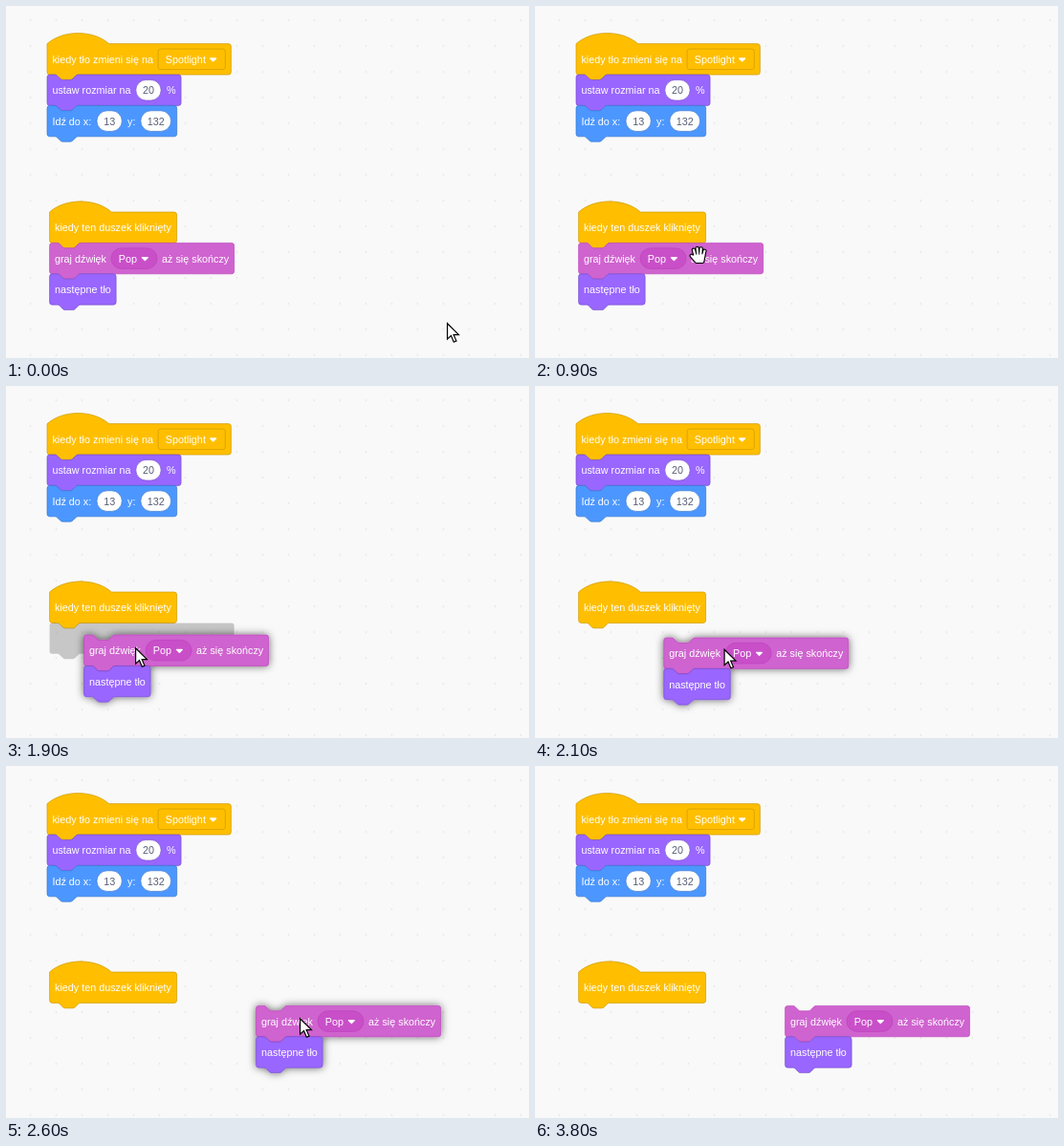
An HTML page that plays this animation: 547x369 px, repeating every 4200 ms.

```html
<!DOCTYPE html>
<html lang="pl">
<head>
<meta charset="utf-8">
<style>
html, body { margin: 0; width: 100%; height: 100%; overflow: hidden; background: #f9f9f9; }
svg { display: block; }
text { font: 16px "Liberation Sans", Arial, sans-serif; fill: #fff; stroke: none; }
.value { fill: #575e75; text-anchor: middle; }
</style>
</head>
<body>
<svg width="547" height="369" viewBox="0 0 547 369">
  <defs>
    <pattern id="dots" x="12" y="1.5" width="27" height="27" patternUnits="userSpaceOnUse">
      <rect x="12.8" y="12.8" width="1.4" height="1.4" fill="#ddd"/>
    </pattern>
    <filter id="shadow" x="-20%" y="-40%" width="140%" height="180%">
      <feDropShadow dx="0" dy="0" stdDeviation="6" flood-opacity=".6"/>
    </filter>
  </defs>
  <rect width="547" height="369" fill="url(#dots)"/>
  <g id="top" transform="translate(43 39.6) scale(.675)"></g>
  <g id="hat" transform="translate(45.6 216) scale(.675)"></g>
  <g id="drag"></g>
  <g id="arrow">
    <path d="M.6 .8V17.2l3.9-3.6 2.8 6.6 2.7-1.1-2.8-6.4h5.3z" fill="#fff" stroke="#000" stroke-width="1.2"/>
  </g>
  <g id="hand" stroke-linecap="round" stroke-linejoin="round"></g>
</svg>
<script>
const $ = id => document.getElementById(id);

const EVENT = ['#ffbf00', '#c90'], LOOKS = ['#96f', '#774dcb'],
      MOTION = ['#4c97ff', '#3373cc'], SOUND = ['#cf63cf', '#bd42bd'];

const CAP = 'M0 0c25-22 71-22 96 0';
const NOTCH = 'M0 4a4 4 0 0 1 4-4H12c2 0 3 1 4 2l4 4c1 1 2 2 4 2h12c2 0 3-1 4-2l4-4c1-1 2-2 4-2';
const outline = (w, start) => `${start}H${w - 4}a4 4 0 0 1 4 4v40a4 4 0 0 1-4 4H48` +
  'c-2 0-3 1-4 2l-4 4c-1 1-2 2-4 2h-12c-2 0-3-1-4-2l-4-4c-1-1-2-2-4-2H4a4 4 0 0 1-4-4z';

const block = (row, [fill, stroke], w, content, start = NOTCH) =>
  `<g transform="translate(0 ${row * 48})" stroke="${stroke}">
    <path d="${outline(w, start)}" fill="${fill}"/>${content}</g>`;
const label = (x, s) => `<text x="${x}" y="30.2">${s}</text>`;
const box = (x, w, r, fill) => `<rect x="${x}" y="8" width="${w}" height="32" rx="${r}" fill="${fill}"/>`;
const input = (x, w, s) => box(x, w, 16, '#fff') + `<text class="value" x="${x + w / 2}" y="30.2">${s}</text>`;
const menu = (x, w, r, fill, s) => box(x, w, r, fill) + label(x + 11.5, s) +
  `<path d="M${x + w - 23} 22.8h8.6l-4.3 4.2z" fill="#fff" stroke="#fff" stroke-width="2" stroke-linejoin="round"/>`;

$('top').innerHTML =
  block(0, EVENT, 285, label(8, 'kiedy tło zmieni się na') + menu(172, 104, 4, EVENT[0], 'Spotlight'), CAP) +
  block(1, LOOKS, 207.5, label(8, 'ustaw rozmiar na') + input(137.5, 39, 20) + label(185, '%')) +
  block(2, MOTION, 201, label(8, 'Idź do x:') + input(77, 39, 13) + label(124.5, 'y:') + input(145, 47, 132));

$('hat').innerHTML =
  block(0, EVENT, 197, label(8, 'kiedy ten duszek kliknięty'), CAP) +
  `<path id="gap" d="${outline(286, NOTCH)}" transform="translate(0 48)" opacity=".2"/>`;

$('drag').innerHTML =
  block(0, SOUND, 286, label(8, 'graj dźwięk') + menu(95.5, 71, 16, '#c94fc9', 'Pop') + label(174, 'aż się skończy')) +
  block(1, LOOKS, 103, label(8, 'następne tło'));

const fingers = 'M-4.6-4.8-3 1M-1.2-6.3-.6 0M2.4-6 2 0M5.8-3.8 4.4 2M-6.6 .8-3 5M-4 1 5 0 3.8 6.2H-2z';
$('hand').innerHTML =
  `<path d="${fingers}" stroke="#000" stroke-width="4"/>` +
  `<path d="${fingers}" stroke="#fff" fill="#fff" stroke-width="2"/>`;

const linear = p => p, smooth = p => p * p * (3 - 2 * p), easeOut = p => p * (2 - p);

// Key points: step of 100 ms, x, y, easing on the way there
const pointer = [
  [1, 461, 332], [7, 243, 270, smooth], [9, 171, 261], [13, 91, 261, easeOut], [16, 91, 261],
  [19, 135, 274], [23, 260, 277], [24, 307, 264], [31, 307, 264], [36, 360, 347, smooth], [38, 361, 372]
];
const dragged = [[17, 0, 0], [19, 36, 12.6], [23, 142.3, 18.5], [24, 189, 18.5], [25, 189, 18.5], [26, 216, 3]];

function at(keys, step) {
  const i = keys.findIndex(k => k[0] >= step);
  const b = keys.at(i), a = i > 0 ? keys[i - 1] : b;
  const [end, x, y, ease = linear] = b;
  const p = a === b ? 1 : ease((step - a[0]) / (end - a[0]));
  return [a[1] + (x - a[1]) * p, a[2] + (y - a[2]) * p];
}

const within = (step, from, to) => step >= from && step <= to;
const show = (id, on) => $(id).style.display = on ? '' : 'none';
const place = (id, x, y, scale) => $(id).setAttribute('transform', `translate(${x} ${y}) scale(${scale})`);

let begin;
function frame(now) {
  begin ??= now;
  const step = Math.floor((now - begin) % 4200 / 100);
  const [x, y] = at(pointer, step), [dx, dy] = at(dragged, step);
  const overBlock = within(step, 8, 17) || within(step, 31, 33);
  place('arrow', x, y, 1);
  place('hand', x, y, 1.1);
  show('hand', overBlock);
  show('arrow', !overBlock);
  place('drag', 45.6 + dx, 248.4 + dy, .675);
  show('gap', within(step, 18, 19));
  $('drag').setAttribute('filter', within(step, 18, 30) ? 'url(#shadow)' : 'none');
  requestAnimationFrame(frame);
}
requestAnimationFrame(frame);
</script>
</body>
</html>
```
